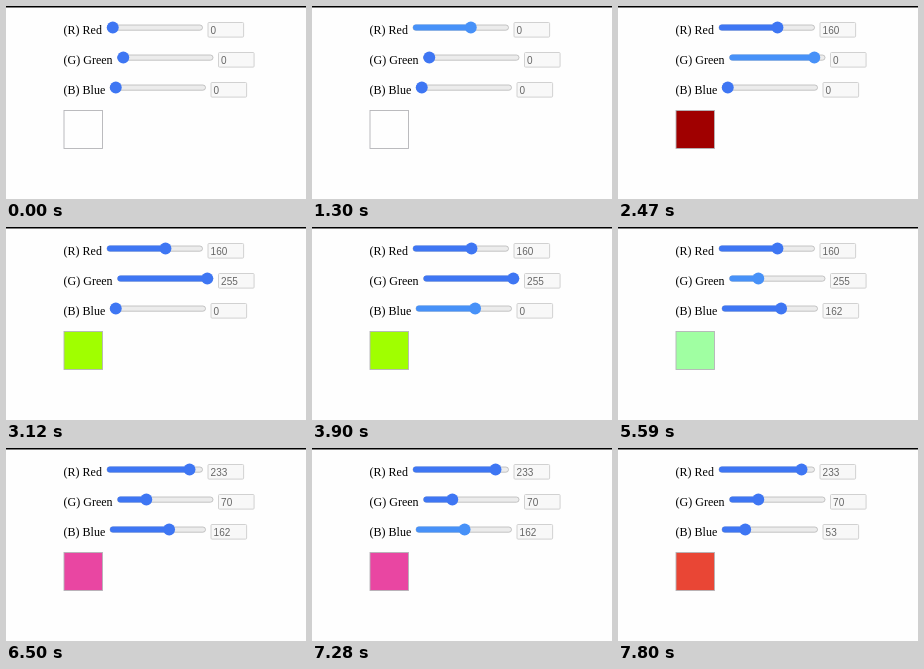
An HTML page that plays this animation: 300x193 px, repeating every 8 s.

```html
<!DOCTYPE html>
<html lang="en">
<head>
<meta charset="utf-8">
<title>RGB sliders</title>
<style>
  html, body { margin: 0; width: 100%; height: 100%; overflow: hidden; background: #fefefe; }
  svg { display: block; width: 100%; height: 100%; }
  .label { font: 12px "Liberation Serif", serif; fill: #000; }
  .value { font: 10px "Liberation Sans", sans-serif; fill: #666; }
  .track { fill: #ececec; stroke: #b6b6b6; stroke-width: .8; }
  .box { fill: #f8f8f8; stroke: #cdcdcd; stroke-width: .9; }
</style>
</head>
<body>
<svg id="stage" viewBox="0 0 300 193">
  <rect width="300" height="1.5" fill="#000"/>
  <rect id="swatch" x="58" y="104.5" width="38.5" height="38" stroke="#b4b4b8" stroke-width=".9"/>
</svg>
<script>
const LOOP = 8000, STEP = 130;
const IDLE = '#3e76f3', PRESSED = '#4791f8';
const stage = document.getElementById('stage');
const swatch = document.getElementById('swatch');

// Each drag: start time, thumb value at each step; the value is committed on release.
const channels = [
  { label: '(R) Red', x: 101, y: 21.5, drags: [
    { at: 910, path: [12, 52, 112, 158, 160] },
    { at: 6110, path: [175, 212, 233] } ] },
  { label: '(G) Green', x: 111.5, y: 51.5, drags: [
    { at: 1950, path: [0, 25, 90, 175, 240, 255, 255] },
    { at: 4940, path: [189, 155, 122, 92, 74, 70] } ] },
  { label: '(B) Blue', x: 104, y: 81.5, drags: [
    { at: 3510, path: [0, 55, 120, 162] },
    { at: 7150, path: [155, 130, 96, 66, 53] } ] }
];

function add(tag, attrs, text = '') {
  const node = document.createElementNS('http://www.w3.org/2000/svg', tag);
  for (const key in attrs) node.setAttribute(key, attrs[key]);
  node.textContent = text;
  return stage.appendChild(node);
}

for (const c of channels) {
  const bar = { x: c.x, y: c.y - 2.5, height: 5.2, rx: 2.6 };
  add('text', { class: 'label', x: 57.6, y: c.y + 6.3 }, c.label);
  add('rect', { ...bar, class: 'track', width: 95.5 });
  c.fill = add('rect', { ...bar, y: c.y - 2.9, height: 6, rx: 3 });
  c.thumb = add('circle', { cy: c.y, r: 5.9 });
  add('rect', { class: 'box', x: c.x + 101, y: c.y - 5, width: 35.6, height: 14.6, rx: 1 });
  c.value = add('text', { class: 'value', x: c.x + 103.6, y: c.y + 6 });
}

function stateAt(drags, time) {
  const state = { position: 0, committed: 0, pressed: false };
  for (const { at, path } of drags) {
    const i = Math.floor((time - at) / STEP);
    if (i < 0) continue;
    state.pressed = i < path.length;
    state.position = path[Math.min(i, path.length - 1)];
    if (!state.pressed) state.committed = state.position;
  }
  return state;
}

function render(time) {
  const rgb = channels.map((c, i) => {
    const { position, committed, pressed } = stateAt(c.drags, time);
    const offset = 5.8 + position / 255 * 84;
    const color = pressed ? PRESSED : IDLE;
    c.fill.setAttribute('width', offset);
    c.fill.setAttribute('fill', color);
    c.thumb.setAttribute('cx', c.x + offset);
    c.thumb.setAttribute('fill', color);
    c.value.textContent = committed;
    return committed;
  });
  // The box stays unpainted until the first value is committed.
  swatch.setAttribute('fill', rgb.some(Boolean) ? `rgb(${rgb})` : '#fefefe');
}

const start = performance.now();
function tick() {
  render((performance.now() - start) % LOOP);
  requestAnimationFrame(tick);
}
tick();
</script>
</body>
</html>
```
